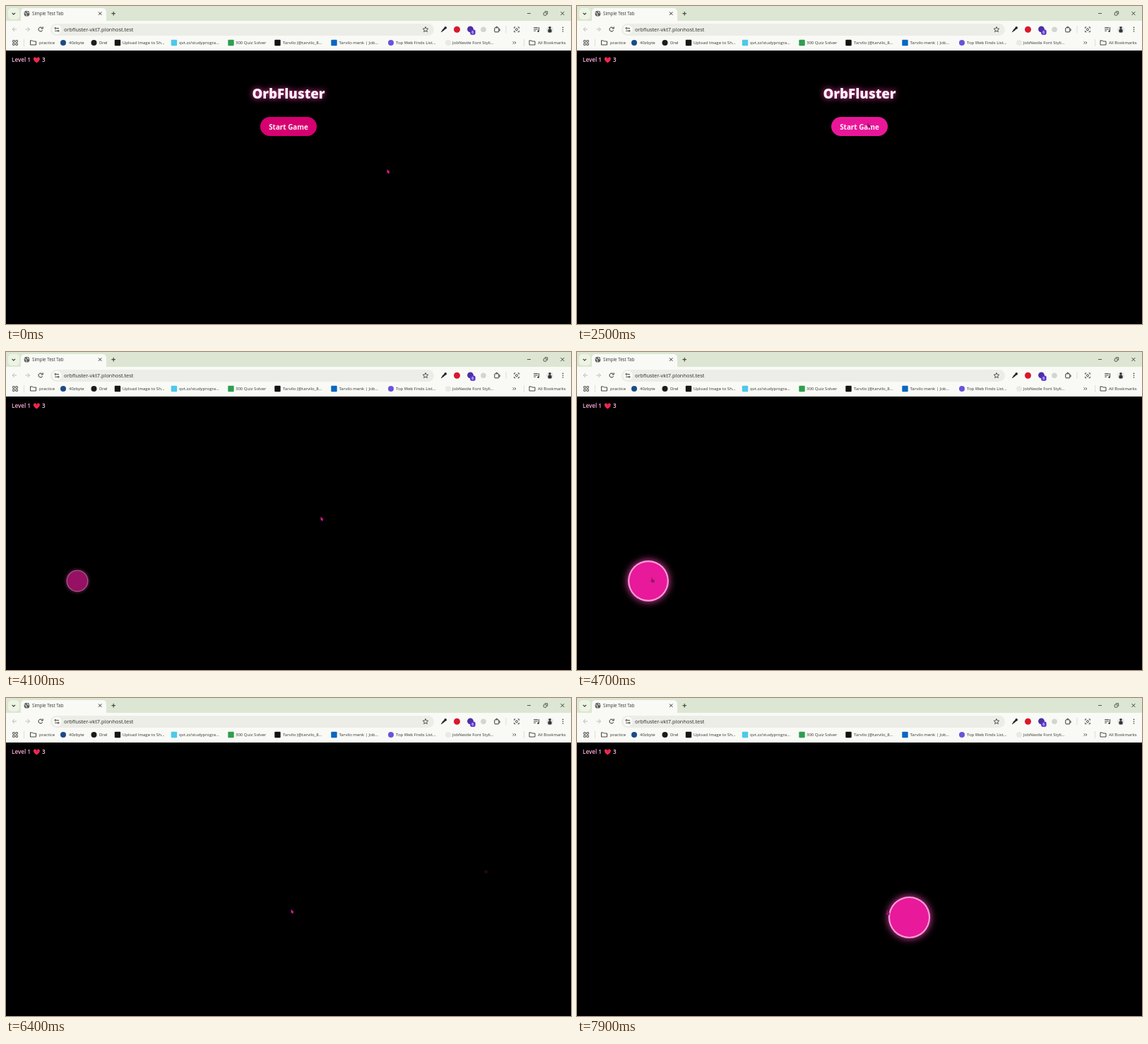
An HTML page with a canvas for the animation above (8 s loop, 800 by 450 pixels).

```html
<!DOCTYPE html>
<html lang="en">
<head>
<meta charset="utf-8">
<title>Reflex game</title>
<style>
html, body { margin: 0; width: 100%; height: 100%; overflow: hidden; background: #000; }
canvas { display: block; width: 800px; height: 450px; }
</style>
</head>
<body>
<canvas id="stage" width="800" height="450"></canvas>
<script>
const ctx = document.getElementById('stage').getContext('2d');
const LOOP = 8000, STEP = 100, RADIUS = 28.9;
const INK = '#31332f', FAINT = '#b9bbb3', BAR = '#f9faf6';

// ---------- drawing helpers ----------
function box(x, y, w, h, r, color) {
  ctx.fillStyle = color;
  ctx.beginPath();
  ctx.roundRect(x, y, w, h, r);
  ctx.fill();
}
function disc(x, y, r, color) {
  ctx.fillStyle = color;
  ctx.beginPath();
  ctx.arc(x, y, r, 0, Math.PI * 2);
  ctx.fill();
}
function ring(x, y, r, color, width = 0.9, from = 0, to = Math.PI * 2) {
  ctx.strokeStyle = color;
  ctx.lineWidth = width;
  ctx.beginPath();
  ctx.arc(x, y, r, from, to);
  ctx.stroke();
}
function line(color, width, ...pts) {
  ctx.strokeStyle = color;
  ctx.lineWidth = width;
  ctx.beginPath();
  for (let i = 0; i < pts.length; i += 2) ctx.lineTo(pts[i], pts[i + 1]);
  ctx.stroke();
}
function frame(x, y, w, h, r, color = INK, width = 0.9) {
  ctx.strokeStyle = color;
  ctx.lineWidth = width;
  ctx.beginPath();
  ctx.roundRect(x, y, w, h, r);
  ctx.stroke();
}
function text(str, x, y, size, color = INK, weight = 400, align = 'left') {
  ctx.font = `${weight} ${size}px "Open Sans", "Noto Sans", sans-serif`;
  ctx.textAlign = align;
  ctx.fillStyle = color;
  ctx.fillText(str, x, y);
}
function glow(color, blur) {
  ctx.shadowColor = color;
  ctx.shadowBlur = blur;
}

// ---------- browser window ----------
const bookmarks = [
  [81, 'disc', '#1c4a86', 89, '40zbyte'],
  [124.5, 'disc', '#1b1b1b', 132, 'Drel'],
  [158, 'box', '#151515', 165, 'Upload Image to Sh...'],
  [238, 'box', '#4cc9ea', 245, 'qvt.zz/studyprogra...'],
  [318.5, 'box', '#2f9e4f', 325, '300 Quiz Solver'],
  [384.5, 'box', '#111111', 392, 'Tarvilo (@tarvilo_8...'],
  [464.5, 'box', '#0a66c2', 471.5, 'Tarvilo menk | Job...'],
  [545, 'disc', '#6a52dc', 552, 'Top Web Finds List...'],
  [626, 'disc', '#e9eae6', 632, 'JobNestle Font Styli...']
];

function folder(x, y) {
  line(INK, 0.9, x - 4, y - 3, x - 1, y - 3, x, y - 2, x + 4, y - 2,
    x + 4, y + 3, x - 4, y + 3, x - 4, y - 3.4);
}

function tabStrip() {
  box(0, 0, 800, 21, 0, '#dde6d3');
  box(3, 3, 16, 16, 5, '#edf4e3');
  line(INK, 1.1, 8.6, 9.9, 10.8, 12, 13, 9.9);
  box(21, 3, 121, 18, [5, 5, 0, 0], BAR);
  disc(29.5, 10.7, 3.9, '#5a5d58');
  line(BAR, 0.9, 26.3, 9.5, 29, 10.6, 28.6, 12.8, 30, 14.2);
  line(BAR, 0.9, 30, 7.2, 30.4, 9.4, 32.8, 9.8);
  text('Simple Test Tab', 37, 13, 6.2);
  line(INK, 1, 131, 8.4, 135.4, 12.8);
  line(INK, 1, 135.4, 8.4, 131, 12.8);
  line(INK, 1, 149.4, 10.7, 155, 10.7);
  line(INK, 1, 152.2, 7.9, 152.2, 13.5);
  line(INK, 0.8, 738, 10.5, 743, 10.5);
  frame(761.2, 9.2, 4, 4, 1, INK, 0.8);
  line(INK, 0.8, 762.7, 7.7, 766.7, 7.7, 766.7, 11.8);
  line(INK, 0.9, 785.4, 8, 790.4, 13);
  line(INK, 0.9, 790.4, 8, 785.4, 13);
}

function star(cx, cy, r) {
  const pts = [];
  for (let i = 0; i <= 10; i++) {
    const a = i * Math.PI / 5 - Math.PI / 2, d = i % 2 ? r * 0.45 : r;
    pts.push(cx + d * Math.cos(a), cy + d * Math.sin(a));
  }
  line(INK, 0.8, ...pts);
}

function toolbar() {
  box(0, 21, 800, 42, 0, BAR);
  for (const [x, dir] of [[12, -1], [30.5, 1]]) {
    line(FAINT, 1, x - 3 * dir, 33, x + 3 * dir, 33);
    line(FAINT, 1, x, 30, x + 3 * dir, 33, x, 36);
  }
  ring(49, 33, 3, INK, 1, 0.4, 5.6);
  line(INK, 1, 52.2, 29.3, 52.2, 32, 49.6, 32);
  box(63, 25, 543, 17, 8.5, '#ecede7');
  disc(72, 33.3, 6.4, '#fcfdf8');
  ring(70, 31.5, 1.1, INK);
  line(INK, 0.9, 71.5, 31.5, 75, 31.5);
  ring(74, 35.2, 1.1, INK);
  line(INK, 0.9, 69, 35.2, 72.5, 35.2);
  text('orbfluster-vkt7.plonhost.test', 82, 35.9, 7.4, '#2a2c28');
  star(594, 33.4, 4);

  line('#22252c', 2.4, 618, 35, 621.5, 31.5);
  line('#22252c', 1.2, 616.4, 36.8, 618, 35);
  disc(622.2, 30.9, 1.8, '#22252c');
  disc(638.5, 33.2, 4.5, '#d9182c');
  disc(657.5, 32.8, 4.4, '#4b2fa8');
  box(657.2, 33.4, 7.4, 7.4, 2, '#5b33c9');
  text('6', 660.9, 39.2, 5.4, '#fff', 600, 'center');
  disc(676, 33.2, 3.8, '#d3d5cf');
  frame(691.8, 30.8, 6, 6, 0.8, INK, 1);
  ring(694.8, 30.4, 1.2, INK, 1, Math.PI, Math.PI * 2);
  ring(698.2, 33.8, 1.2, INK, 1, -Math.PI / 2, Math.PI / 2);

  line('#d4d8cd', 0.8, 708, 28, 708, 38);
  for (const sx of [-1, 1]) for (const sy of [-1, 1]) {
    line(INK, 0.9, 723 + sx * 3.4, 33.3 + sy * 1.6, 723 + sx * 3.4, 33.3 + sy * 3.4,
      723 + sx * 1.6, 33.3 + sy * 3.4);
  }
  ring(723, 33.3, 1.5, INK);
  for (const [y, w] of [[30.5, 6], [32.8, 6], [35.1, 3]]) line(INK, 0.9, 747.2, y, 747.2 + w, y);
  line(INK, 0.9, 754.6, 30, 754.6, 35.6);
  disc(753.6, 35.8, 1.2, INK);
  disc(770, 33.2, 5, '#e6e8e4');
  disc(770, 30.6, 1.7, '#30343a');
  box(767.4, 32.2, 5.2, 5.4, [2.5, 2.5, 1.5, 1.5], '#30343a');
  for (const y of [30.4, 33.2, 36]) disc(788.5, y, 0.8, INK);
}

function bookmarkBar() {
  for (const x of [9.6, 13.8]) for (const y of [48.6, 52.8]) frame(x, y, 2.6, 2.6, 0.2, INK, 0.8);
  line('#d4d8cd', 0.8, 25.5, 47, 25.5, 57);
  folder(38.5, 52);
  text('practice', 47, 54.3, 6);
  for (const [x, shape, color, tx, label] of bookmarks) {
    if (shape === 'disc') disc(x, 52, 4, color);
    else box(x - 4.2, 47.8, 8.4, 8.4, 1, color);
    text(label, tx, 54.3, 6);
  }
  for (const x of [717.6, 720.2]) line(INK, 0.8, x, 50.2, x + 1.8, 52, x, 53.8);
  line('#d4d8cd', 0.8, 733.5, 47, 733.5, 57);
  folder(745, 52);
  text('All Bookmarks', 753, 54.3, 5.95);
}

// ---------- game ----------
function heart(x, y, cracked) {
  ctx.fillStyle = '#f0284f';
  ctx.beginPath();
  ctx.moveTo(x, y + 4.2);
  ctx.bezierCurveTo(x - 8, y - 1, x - 3.6, y - 6.6, x, y - 2.4);
  ctx.bezierCurveTo(x + 3.6, y - 6.6, x + 8, y - 1, x, y + 4.2);
  ctx.fill();
  if (cracked) line('#9c1038', 0.8, x, y - 2.6, x + 0.8, y - 1.2, x - 0.2, y - 0.2);
}

function hud(t) {
  text('Level 1', 8, 79, 8.1, '#ffaede', 600);
  heart(43.4, 76.4, t >= 1200 && t < 7300 || t >= 7900);
  text('3', 51, 79, 8.1, '#ffc6e8', 600);
}

function mix(a, b, k) {
  return `rgb(${a.map((v, i) => Math.round(v + (b[i] - v) * k))})`;
}

function startScreen(t) {
  glow('#ff3dac', 9);
  text('OrbFluster', 400, 131.4, 18.7, '#fff4fb', 800, 'center');
  glow('transparent', 0);
  const hover = Math.min(1, Math.max(0, (t - 1600) / 200));
  box(360, 157, 80, 27, 13.5, mix([214, 0, 112], [234, 22, 153], hover));
  text('Start Game', 400, 174.6, 9.9, '#fff0f9', 700, 'center');
}

const targets = [
  { x: 101, y: 324, enter: 4038, leave: 4700 },
  { x: 426.5, y: 329.5, enter: 5126, leave: 6000 },
  { x: 679.5, y: 246, enter: 6382, leave: 7265 },
  { x: 470.5, y: 310.5, enter: 7650, leave: Infinity }
];

// Underdamped spring on the way in, quick shrink and fade on the way out.
function pose(target, t) {
  const s = (t - target.enter) / 1000, out = (t - target.leave) / 200;
  if (s <= 0 || out >= 1) return null;
  if (out > 0) {
    const k = 1 - (1 - out) ** 1.4;
    return { scale: 1 - 0.29 * k, alpha: 1 - k };
  }
  const scale = 1 - Math.exp(-15 * s) * (Math.cos(18 * s) + 0.833 * Math.sin(18 * s));
  return { scale, alpha: Math.min(1, scale * 1.1 + 0.06) };
}

function drawTarget({ x, y }, { scale, alpha }) {
  const r = RADIUS * scale;
  glow('#f048ae', 10.4 * scale);
  disc(x, y, r, '#ff9bdb');
  glow('transparent', 0);
  disc(x, y, Math.max(0, r - 2.1 * scale), '#e8199a');
  if (alpha < 1) box(x - 50, y - 50, 100, 100, 0, `rgba(0,0,0,${1 - alpha})`);
}

// ---------- pointer ----------
const path = [
  [1100, 541, 234], [1800, 428, 179], [1900, 428, 179], [2200, 413, 169], [2700, 413, 169],
  [3500, 452, 273], [3600, 452, 273], [4100, 447, 236], [4300, 425, 246], [4650, 108, 322],
  [4750, 106, 324], [5300, 262, 277], [5800, 412, 310], [5900, 412, 310], [6200, 405, 302],
  [6400, 405, 302], [7200, 680, 254], [7400, 673, 258], [7900, 440, 304]
];

function pointerAt(t) {
  const i = path.findIndex(p => p[0] >= t);
  if (i <= 0) return path[i < 0 ? path.length - 1 : 0].slice(1);
  const [t0, x0, y0] = path[i - 1], [t1, x1, y1] = path[i];
  const k = (t - t0) / (t1 - t0);
  return [x0 + (x1 - x0) * k, y0 + (y1 - y0) * k];
}

function drawPointer(x, y, hand, color) {
  if (hand) {
    box(x - 1.4, y - 3.4, 1.3, 5, 0.6, color);
    box(x - 1.6, y - 0.8, 4.2, 4, 1.2, color);
    line(color, 1, x - 2.6, y, x - 0.6, y + 2.2);
    return;
  }
  ctx.fillStyle = color;
  ctx.beginPath();
  for (const [dx, dy] of [[-1.4, -3], [2.8, 1], [1.2, 1.2], [1.9, 2.9], [0.6, 3.2], [-0.2, 1.7], [-1.4, 2.6]])
    ctx.lineTo(x + dx, y + dy);
  ctx.fill();
}

function render(t) {
  box(0, 0, 800, 450, 0, '#000');
  const [px, py] = pointerAt(t);
  let hand = false, lit = false;

  if (t < 2800) {
    startScreen(t);
    hand = lit = px > 360 && px < 440 && py > 157 && py < 184;
  }
  for (const target of targets) {
    const p = pose(target, t);
    if (!p) continue;
    drawTarget(target, p);
    if (Math.hypot(px - target.x, py - target.y) < RADIUS * p.scale + 3) {
      hand = true;
      lit = p.alpha > 0.6;
    }
  }
  hud(t);
  drawPointer(px, py, hand, lit ? '#861a63' : '#dc1c98');
  tabStrip();
  toolbar();
  bookmarkBar();
}

// The picture advances in tenths of a second.
const start = performance.now();
function tick() {
  const t = Math.max(0, performance.now() - start) % LOOP;
  render(Math.floor(t / STEP) * STEP);
  requestAnimationFrame(tick);
}
tick();
</script>
</body>
</html>
```
